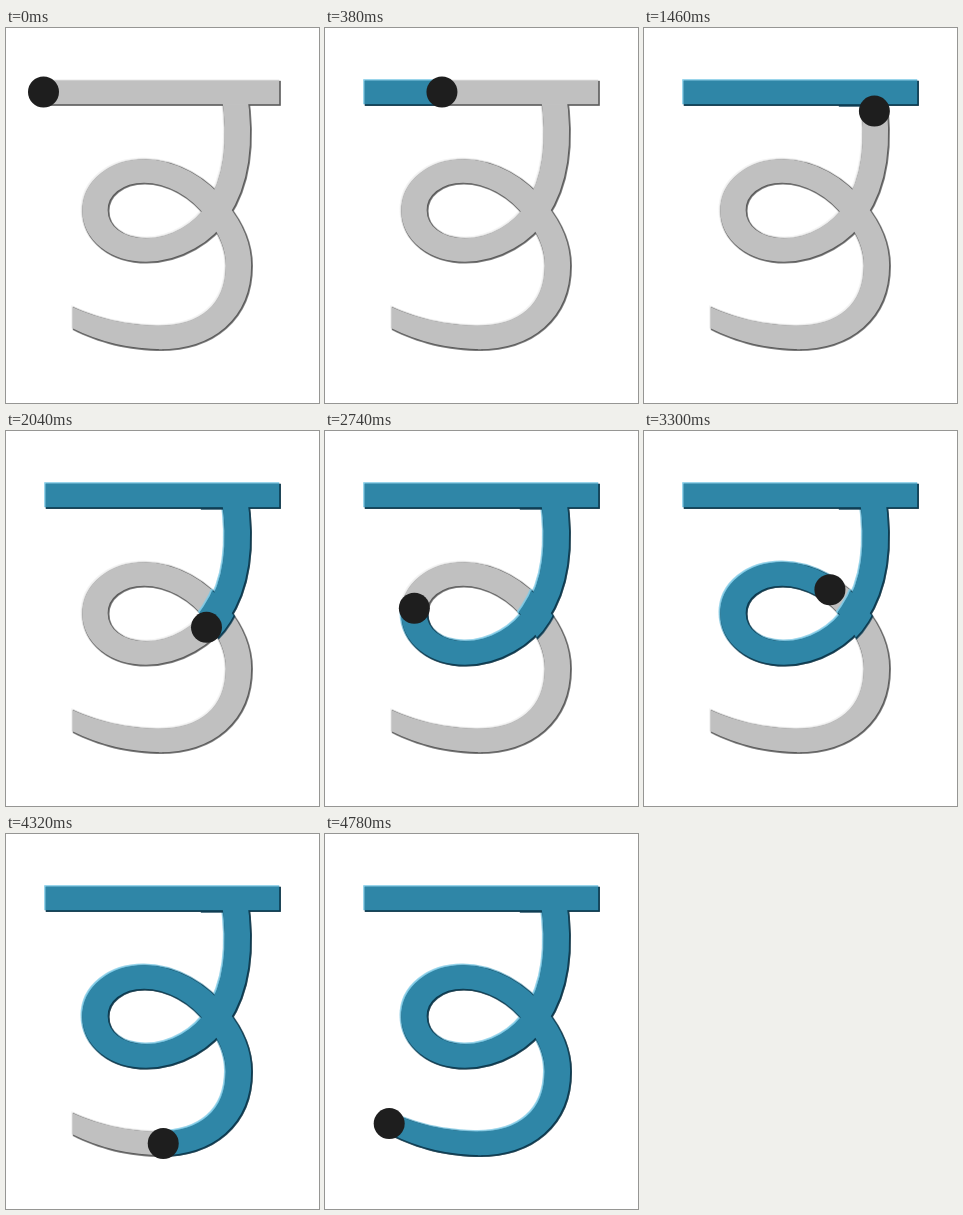
An HTML page with a canvas that plays this animation: 313 by 375 pixels, repeating every 4800 ms.

```html
<!DOCTYPE html>
<html lang="en">
<head>
<meta charset="utf-8">
<title>Letter stroke order</title>
<style>
html, body { margin: 0; width: 100%; height: 100%; overflow: hidden; background: #fff; }
canvas { display: block; }
</style>
</head>
<body>
<canvas id="stage" width="313" height="375"></canvas>
<script>
const W = 313, H = 375, LOOP = 4800, STEP = 20;
const BEVEL = 0.8, REVEAL = 32;
const ctx = document.getElementById('stage').getContext('2d');

const BODY = 'M228 64 C234.5 105 233 150 211 183 C198.5 204 170 222 140 222 ' +
  'C110 222 89 205 89 182 C89 160 110 143 138 143 ' +
  'C165 143 193 158.5 211 183 C224 199 232.5 217 232.5 237 ' +
  'C232.5 284 200 309.5 153 309.5';
const TAIL = 'M157 297 C118 297 90 289 66 278 V301 C92 314 120 322 157 322 Z';
const ROUTE = 'M37.5 64 H275 H228 ' + BODY.slice(BODY.indexOf('C')) +
  ' C120 309.5 88 300 64 289.5';

// Moments (ms) at which the pen passes given points; speed is even between them.
const WAYPOINTS = [
  [0, 37.5, 64], [1136, 275, 64], [1460, 231, 83], [2040, 201, 197],
  [2740, 88, 177], [3860, 228, 258], [4780, 64, 289.5]
];

const route = document.createElementNS('http://www.w3.org/2000/svg', 'path');
route.setAttribute('d', ROUTE);
const routePath = new Path2D(ROUTE);
const total = route.getTotalLength();

function nearestLength(x, y, from) {
  let best = from, bestDist = Infinity;
  for (let s = from; s <= Math.min(total, from + 270); s += 0.25) {
    const p = route.getPointAtLength(s);
    const d = Math.hypot(p.x - x, p.y - y);
    if (d < bestDist) { bestDist = d; best = s; }
  }
  return best;
}

const keys = [];
for (const [time, x, y] of WAYPOINTS) {
  const from = keys.length ? keys[keys.length - 1].s : 0;
  keys.push({ time, s: keys.length ? nearestLength(x, y, from) : 0 });
}

function lengthAt(t) {
  for (let i = 1; i < keys.length; i++) {
    const a = keys[i - 1], b = keys[i];
    if (t <= b.time) return a.s + (b.s - a.s) * (t - a.time) / (b.time - a.time);
  }
  return keys[keys.length - 1].s;
}

function makeLayer() {
  const canvas = document.createElement('canvas');
  canvas.width = W;
  canvas.height = H;
  return canvas.getContext('2d');
}

// The pen is slightly wider than tall, so the body is stroked in a stretched space.
function silhouette(color, inset) {
  const g = makeLayer();
  const ratio = 27 / 25;
  const squeezed = new Path2D();
  squeezed.addPath(new Path2D(BODY), new DOMMatrix([1 / ratio, 0, 0, 1, 0, 0]));
  const tail = new Path2D(TAIL);
  g.fillStyle = g.strokeStyle = color;
  g.fill(tail);
  if (inset) {
    g.globalCompositeOperation = 'destination-out';
    g.lineWidth = 2 * inset;
    g.stroke(tail);
    g.globalCompositeOperation = 'source-over';
  }
  g.lineWidth = 25 - 2 * inset;
  g.save();
  g.scale(ratio, 1);
  g.stroke(squeezed);
  g.restore();
  g.fillRect(39 + inset, 52 + inset, 235 - 2 * inset, 25 - 2 * inset);
  return g;
}

function bevelLayers(face, light, dark) {
  return [
    { g: silhouette(light, 0), shift: -BEVEL, inset: 0 },
    { g: silhouette(dark, 0), shift: BEVEL, inset: 0 },
    { g: silhouette(face, BEVEL), shift: 0, inset: BEVEL }
  ];
}

const grey = bevelLayers('#c0c0c0', '#f0f0f0', '#5a5a5a');
const teal = bevelLayers('#2f86a7', '#7ccbe8', '#0b3a50');
teal[1].g.fillRect(194, 76, 22, 1.8);
const ink = makeLayer();

// Each bevel layer is cut to the travelled part first, so the cut gets bevelled too.
function drawInk(s) {
  for (const { g, shift, inset } of teal) {
    ink.globalCompositeOperation = 'source-over';
    ink.clearRect(0, 0, W, H);
    ink.lineWidth = REVEAL - 2 * inset;
    ink.setLineDash([s, total + 10]);
    ink.stroke(routePath);
    ink.globalCompositeOperation = 'source-in';
    ink.drawImage(g.canvas, 0, 0);
    ctx.drawImage(ink.canvas, shift, shift);
  }
}

function draw(t) {
  const s = lengthAt(t);
  const pen = route.getPointAtLength(s);

  ctx.fillStyle = '#fff';
  ctx.fillRect(0, 0, W, H);
  for (const { g, shift } of grey) ctx.drawImage(g.canvas, shift, shift);
  if (s > 0) drawInk(s);

  ctx.fillStyle = '#1e1e1e';
  ctx.beginPath();
  ctx.arc(pen.x, pen.y, 15.5, 0, Math.PI * 2);
  ctx.fill();
}

const start = performance.now();
function tick() {
  const t = (performance.now() - start) % LOOP;
  draw(Math.floor(t / STEP) * STEP);
  requestAnimationFrame(tick);
}
tick();
</script>
</body>
</html>
```
